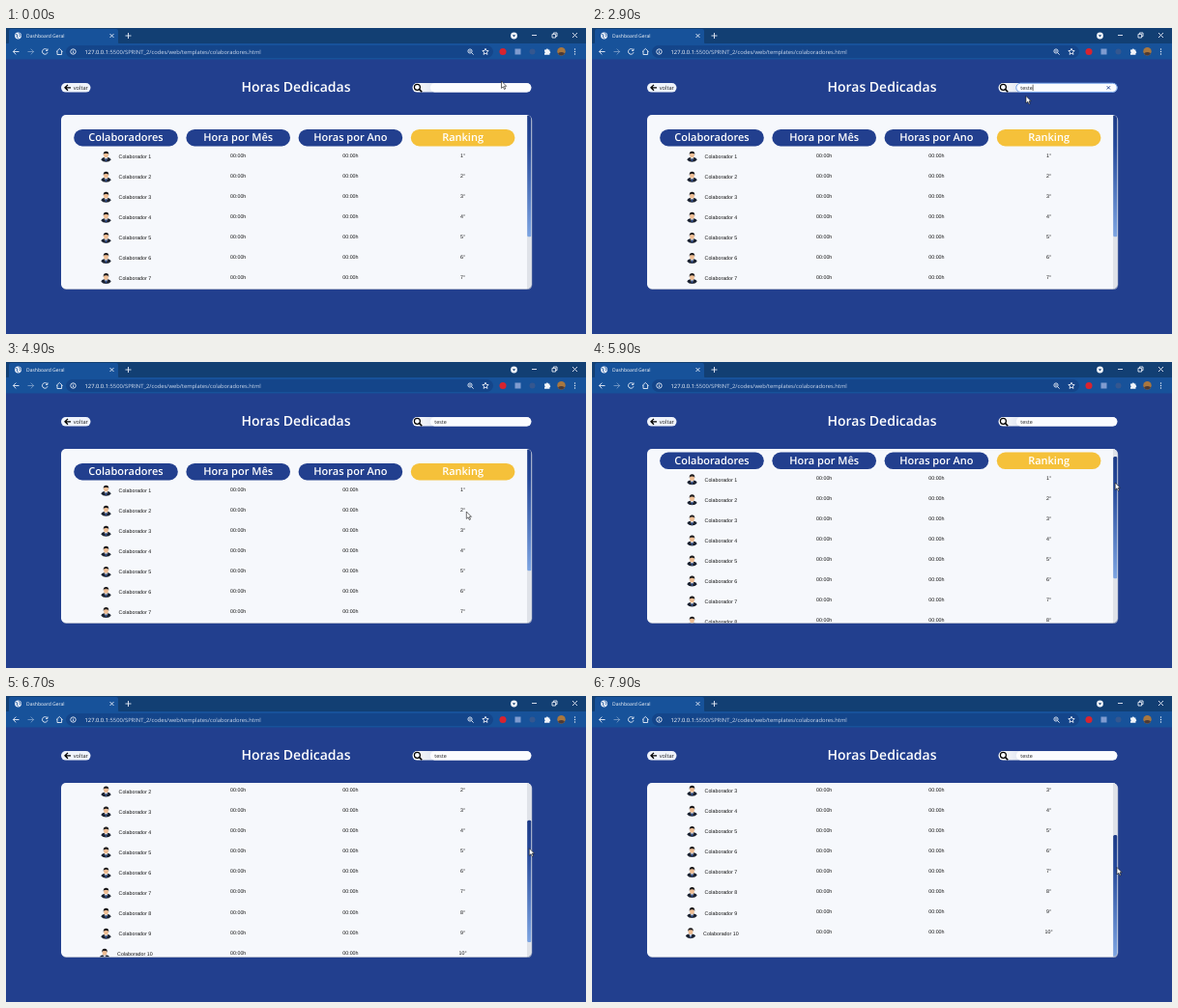
Recreate the animation shown at these times as an HTML page. Size 600 by 317 pixels, loop 8 s.

```html
<!DOCTYPE html>
<html lang="pt">
<head>
<meta charset="utf-8">
<title>Horas Dedicadas</title>
<style>
  html, body { margin: 0; width: 100%; height: 100%; overflow: hidden; background: #223f8e; }
  svg { display: block; width: 600px; height: 317px; font-family: "Open Sans", "Noto Sans", sans-serif; }
  text { text-rendering: geometricPrecision; white-space: pre; }
  .line { fill: none; stroke: #e8eef8; stroke-width: .9; }
  .head { font-size: 11px; font-weight: 600; fill: #fff; text-anchor: middle; }
  .row { font: 5.3px "Liberation Sans", Arial, sans-serif; fill: #111; }
  .mid { text-anchor: middle; }
</style>
</head>
<body>
<svg viewBox="0 0 600 317">
  <defs>
    <clipPath id="panel"><rect x="57" y="90" width="486.5" height="180.3" rx="5"/></clipPath>
    <linearGradient id="thumbFill" x2="0" y2="1">
      <stop stop-color="#1d3b87"/><stop offset=".25" stop-color="#24489a"/><stop offset="1" stop-color="#7da5e2"/>
    </linearGradient>
    <linearGradient id="searchFill">
      <stop stop-color="#fff"/><stop offset=".16" stop-color="#e3e8f2"/>
    </linearGradient>
    <g id="person">
      <path d="M-5.2 3.2Q-4.6 1.2 -1.8 .8H1.8Q4.6 1.2 5.2 3.2Q3.6 5.5 0 5.5T-5.2 3.2Z" fill="#1b2230"/>
      <path d="M-1.6 .8L0 5L1.6 .8Z" fill="#fff"/>
      <path d="M-.4 1.8H.4L.6 4L0 5L-.6 4Z" fill="#2b4f9c"/>
      <ellipse cy="-1.6" rx="2.4" ry="3" fill="#eebd93"/>
      <path d="M-2.7 -1.6Q-3.2 -5.4 0 -5.5T2.7 -1.6L2 -3.1Q0 -3.5 -2 -3.1Z" fill="#1c1a1c"/>
    </g>
  </defs>

  <!-- browser frame -->
  <rect width="600" height="17" fill="#123f73"/>
  <path d="M1 17Q3 17 3 14V3Q3 1 5 1H114Q116 1 116 3V14Q116 17 118 17Z" fill="#17529a"/>
  <rect y="16" width="600" height="16.5" fill="#17529a"/>
  <rect x="62" y="18" width="442" height="13" rx="6.5" fill="#14458a"/>
  <circle cx="12.5" cy="8" r="3.4" fill="#e8eef8"/>
  <path d="M10 6.5L12 7.2L11.3 9L12.6 10.6M13.5 5L14.8 7.4L14 9" fill="none" stroke="#17529a" stroke-width=".8"/>
  <text x="21" y="10" font-size="5" fill="#fff">Dashboard Geral</text>
  <path class="line" d="M107.5 6L111.5 10M111.5 6L107.5 10M123.5 8H129.5M126.5 5V11"/>
  <circle cx="525.5" cy="8" r="3.4" fill="#f2f5fa"/>
  <path d="M524 7.3H527L525.5 9.4Z" fill="#123f73"/>
  <path class="line" d="M544 7.5H549M565 6.4H568.6V10H565ZM566.4 6.2V5H570V8.6H568.8M586 5L591 10M591 5L586 10"/>
  <path class="line" d="M13.5 24.5H7.5M10.3 21.6L7.4 24.5L10.3 27.4"/>
  <path class="line" opacity=".45" d="M22.5 24.5H28.5M25.7 21.6L28.6 24.5L25.7 27.4"/>
  <path class="line" d="M42.6 22.8A2.8 2.8 0 1 0 43 25.2M43 21.4V23.4H41"/>
  <path class="line" d="M52 24.6L55.3 21.4L58.6 24.6M53 24V27.5H57.6V24"/>
  <g class="line" stroke-width=".7"><circle cx="69.5" cy="24.5" r="2.7"/><path d="M69.5 24.2V26M69.5 22.8V23.5"/></g>
  <text x="81.5" y="26.5" font-size="5.8" fill="#cfdbee"><tspan fill="#fff">127.0.0.1</tspan>:5500/SPRINT_2/codes/web/templates/colaboradores.html</text>
  <g class="line"><circle cx="480" cy="24" r="2.1"/><path d="M481.6 25.6L483.6 27.6M479 24H481"/></g>
  <path class="line" stroke-width=".7" d="M496 21.2L496.9 23.4L499.2 23.6L497.4 25.1L498 27.4L496 26.1L494 27.4L494.6 25.1L492.8 23.6L495.1 23.4Z"/>
  <circle cx="514" cy="24.5" r="3.5" fill="#d8232f"/>
  <rect x="526.5" y="21.5" width="6" height="6" fill="#7f9bd0"/>
  <circle cx="544.5" cy="24.5" r="3" fill="#34578f"/>
  <path d="M557 22.6H558.6A1.2 1.2 0 0 1 561 22.6H562.4V24A1.2 1.2 0 0 1 562.4 26.3V27.8H557V26.2A1.1 1.1 0 0 0 557 24.2Z" fill="#f2f5fa"/>
  <circle cx="574.5" cy="24.3" r="4.2" fill="#a9773f"/>
  <path d="M571 26.3Q574.5 23.5 578 26.3Q576.8 28.5 574.5 28.5T571 26.3Z" fill="#4c3a36"/>
  <g fill="#e8eef8"><circle cx="588.5" cy="22" r=".7"/><circle cx="588.5" cy="24.5" r=".7"/><circle cx="588.5" cy="27" r=".7"/></g>

  <!-- page header -->
  <text class="mid" x="300" y="66.3" font-size="14" font-weight="600" fill="#fff">Horas Dedicadas</text>
  <rect x="57" y="57" width="30.5" height="9.6" rx="4.8" fill="#eff3fb"/>
  <path d="M67 61.8H61M64 58.9L61 61.8L64 64.7" fill="none" stroke="#000" stroke-width="1.3"/>
  <text x="69.7" y="63.8" font-size="5.7" fill="#222">voltar</text>
  <rect x="420.5" y="57" width="123" height="9.6" rx="4.8" fill="url(#searchFill)"/>
  <rect id="field" x="438.8" y="57.2" width="104.4" height="9.2" rx="4.6" fill="#fbfcff"/>
  <g fill="none" stroke="#000"><circle cx="425.4" cy="61.3" r="3" stroke-width="1.2"/><path d="M427.6 63.5L430.2 66.2" stroke-width="1.6"/></g>
  <text id="query" x="443.3" y="63.8" font-size="5.4" fill="#222"></text>
  <path id="caret" d="M0 58.7V65" stroke="#111" stroke-width=".6"/>
  <path id="clear" d="M532.7 60.2L536 63.5M536 60.2L532.7 63.5" stroke="#1f3f8f" stroke-width=".9"/>

  <!-- table -->
  <rect x="57.6" y="90.8" width="486.7" height="180.3" rx="5" fill="#8d99b8"/>
  <g clip-path="url(#panel)">
    <rect x="57" y="90" width="487" height="181" fill="#f6f8fc"/>
    <g id="table"></g>
    <rect x="539" y="90" width="5" height="181" fill="#dfe2e8"/>
    <rect id="thumb" x="539.2" y="90" width="4.3" height="126.3" rx="1.5" fill="url(#thumbFill)"/>
  </g>

  <path id="arrow" d="M0 0V7.4L1.8 5.8L3 8.5L4.2 8L3 5.3H5.2Z" fill="#fff" stroke="#111" stroke-width=".6"/>
  <path id="beam" d="M-1.5 -3.5H1.5M0 -3.5V3.5M-1.5 3.5H1.5" fill="none" stroke="#111" stroke-width=".7"/>
</svg>
<script>
const $ = id => document.getElementById(id);
const LOOP = 8000, FRAME = 100, MAX_SCROLL = 77, TRAVEL = 54;
const WORD = 'teste', CLICK = 1200, TYPE = 1900, KEY_GAP = 150, BLUR = 3500;
const typed = TYPE + KEY_GAP * (WORD.length - 1);

// [time, x, y]
const pointer = [[0, 512.5, 55], [300, 512.5, 55], [1000, 456, 61], [2400, 456, 61],
  [2900, 449, 70.5], [3500, 462, 165], [4100, 480, 194], [4900, 476.3, 155],
  [5400, 541, 119], [5900, 541.2, 125], [6700, 541.3, 157.8], [7200, 543, 178],
  [7500, 543.5, 192], [7800, 543, 177.5], [8000, 543, 177.5]];
// [time, offset]
const scrolling = [[0, 0], [5400, 0], [5900, 11.4], [6700, 55.3], [7200, MAX_SCROLL], [8000, MAX_SCROLL]];

function at(keys, t, col) {
  const i = keys.findIndex(k => k[0] > t), a = keys[i - 1], b = keys[i];
  return a[col] + (b[col] - a[col]) * (t - a[0]) / (b[0] - a[0]);
}

const columns = ['Colaboradores', 'Hora por Mês', 'Horas por Ano', 'Ranking'];
const center = i => 124 + 116.2 * i;
let markup = columns.map((name, i) =>
  `<rect x="${center(i) - 53.8}" y="105" width="107.6" height="17.4" rx="8.7" fill="${i < 3 ? '#223f8e' : '#f5c13a'}"/>
   <text class="head" x="${center(i)}" y="117.2">${name}</text>`).join('');
for (let n = 1; n <= 10; n++) {
  const y = 133.2 + 21.05 * (n - 1), shift = n > 9 ? -1.5 : 0;
  const cell = (i, text) => `<text class="row mid" x="${center(i)}" y="${y + .3}">${text}</text>`;
  markup += `<use href="#person" x="${103.5 + shift}" y="${y}"/>
    <text class="row" x="${116.6 + shift}" y="${y + 1.9}">Colaborador ${n}</text>` +
    cell(1, '00:00h') + cell(2, '00:00h') + cell(3, n + '°');
}
$('table').innerHTML = markup;

const show = (id, on) => $(id).setAttribute('visibility', on ? 'visible' : 'hidden');
const move = (id, x, y) => $(id).setAttribute('transform', `translate(${x} ${y})`);

function draw(now) {
  const t = Math.floor(now % LOOP / FRAME) * FRAME;
  const x = at(pointer, t, 1), y = at(pointer, t, 2), scroll = at(scrolling, t, 1);
  const count = t < TYPE ? 0 : Math.min(WORD.length, 1 + Math.floor((t - TYPE) / KEY_GAP));
  const focused = t >= CLICK && t < BLUR;
  const overField = x > 439 && x < 543 && y > 57 && y < 67;
  const typing = t >= TYPE && t < typed;
  const blinkStart = t < TYPE ? CLICK : typed;

  $('query').textContent = WORD.slice(0, count);
  move('caret', 443.5 + (count ? $('query').getComputedTextLength() + .2 : 0), 0);
  show('caret', focused && (typing || (t - blinkStart) % 1000 < 500));
  show('clear', count && (focused || overField));
  $('field').setAttribute('stroke', focused && t > 1400 ? '#6f9fe8' : 'none');

  move('table', 0, -scroll);
  move('thumb', 0, scroll / MAX_SCROLL * TRAVEL);
  move('arrow', x, y);
  move('beam', x, y);
  show('arrow', !overField);
  show('beam', overField);
  requestAnimationFrame(draw);
}
requestAnimationFrame(draw);
</script>
</body>
</html>
```
